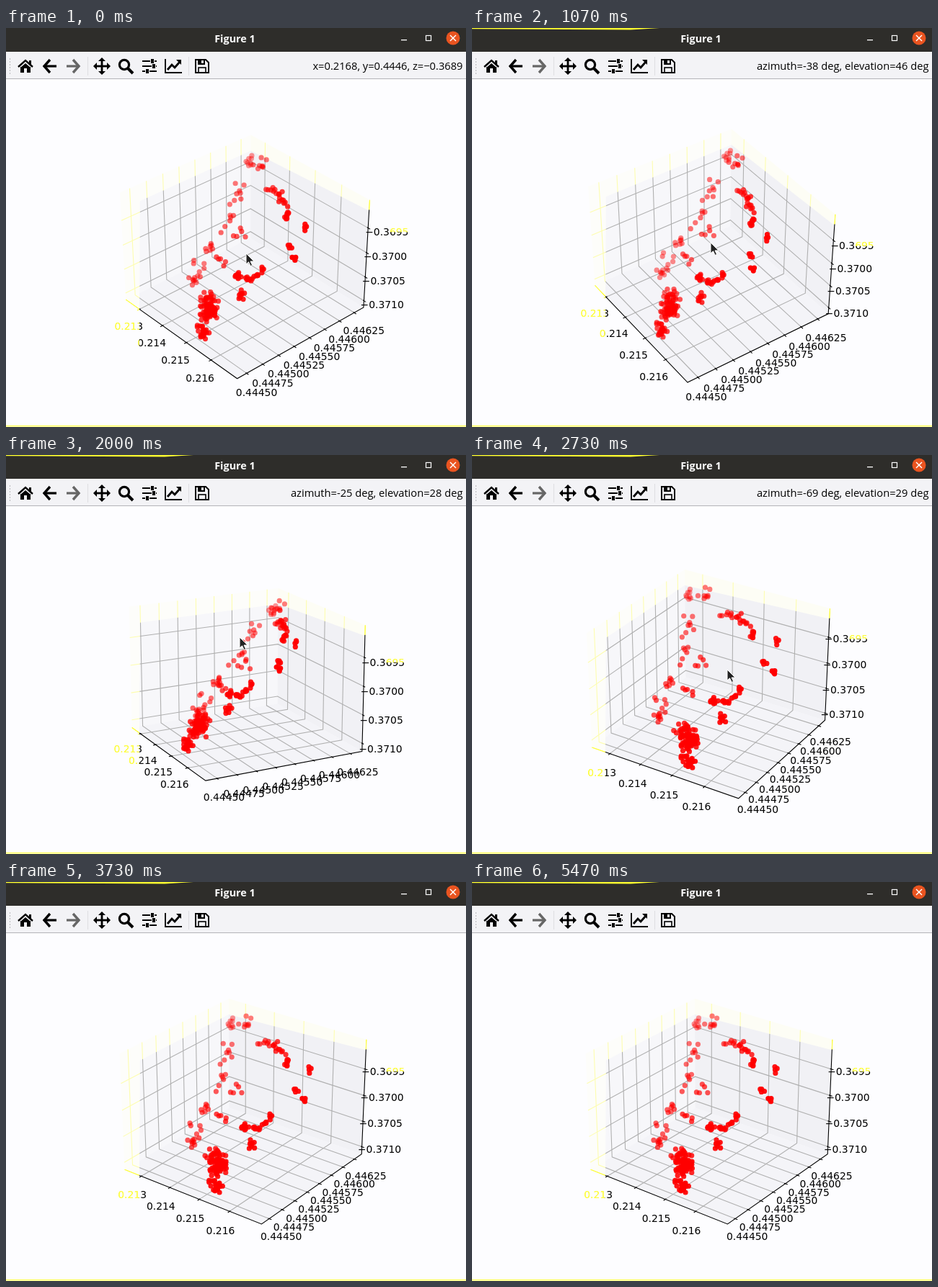
Animation of 638x554 px, one loop 5540 ms. Source, as an HTML page with a canvas:

```html
<!DOCTYPE html>
<html lang="en">
<head>
<meta charset="utf-8">
<title>Figure 1</title>
<style>
  html, body { margin: 0; width: 100%; height: 100%; overflow: hidden; background: #fdfdff; }
  canvas { display: block; }
</style>
</head>
<body>
<canvas id="stage" width="638" height="554"></canvas>
<script>
const ctx = document.getElementById('stage').getContext('2d');
const W = 638, H = 554, LOOP = 5540;
const DRAG_START = 200, DRAG_END = 3250, STATUS_LAG = 130;
const HX = 0.5952, HZ = 0.4464;      // half sizes of the plot box
const PAD = 0.0986, PAD_Z = 0.0739;  // distance of tick labels from the box
const YELLOW = 'rgb(253,253,70)', EDGE_YELLOW = '#ffff30', TOOLBAR = '#f3f3f6';

// time, azimuth, elevation
const VIEW = [
  [DRAG_START, -41.8, 34], [930, -38, 46], [1070, -34.65, 40], [1870, -25, 28],
  [2000, -27.65, 17], [2600, -69, 29], [2730, -57.7, 29], [DRAG_END, -52.7, 27]
];
// time, x, y
const POINTER = [[DRAG_START, 333, 313], [1070, 331, 298], [2000, 324, 253], [2730, 354, 298]];

let seed = 7;
const random = () => (seed = (seed * 16807) % 2147483647) / 2147483647;
const jitter = size => (random() + random() + random() - 1.5) * 1.6 * size;

// Scatters points around each node, reaching part of the way to the next one
const strand = (count, reach, spread, ...nodes) => nodes.flatMap((node, i) => {
  const next = nodes[i + 1] || node;
  return Array.from({ length: count }, () => {
    const k = random() * reach;
    return node.map((v, axis) => v + (next[axis] - v) * k + jitter(spread));
  });
});

const points = [
  ...strand(8, 0, 0.026, [-0.5, 0.49, 0.305], [-0.32, 0.44, 0.375]),
  ...strand(7, 0.8, 0.026, [-0.34, 0.3, 0.28], [-0.3, 0.15, 0.13], [-0.27, -0.02, -0.02],
    [-0.33, -0.09, -0.16], [-0.29, -0.22, -0.3]),
  ...strand(5, 0, 0.03, [-0.13, 0.06, 0.08], [-0.1, -0.14, -0.06]),
  ...strand(9, 0.8, 0.012, [-0.11, 0.31, 0.33], [0.07, 0.27, 0.38], [0.23, 0.19, 0.32]),
  ...strand(4, 0.1, 0.011, [0.44, 0.16, 0.34], [0.39, 0.06, 0.22], [0.5, -0.01, 0.2]),
  ...strand(10, 0.7, 0.014, [0.31, -0.1, 0.06], [0.25, -0.16, -0.03], [0.14, -0.19, -0.05]),
  ...strand(9, 0, 0.02, [0.26, -0.27, -0.11]),
  ...strand(36, 0.8, 0.036, [-0.06, -0.31, -0.24], [0.1, -0.4, -0.28]),
  ...strand(14, 0.9, 0.02, [0.04, -0.44, -0.31], [0.17, -0.52, -0.36])
];

function sample(keys, t) {
  if (t <= keys[0][0]) return keys[0].slice(1);
  const i = keys.findIndex(key => key[0] > t);
  if (i < 0) return keys[keys.length - 1].slice(1);
  const a = keys[i - 1], b = keys[i], k = (t - a[0]) / (b[0] - a[0]);
  return [1, 2].map(c => a[c] + (b[c] - a[c]) * k);
}

function camera([azimuth, elevation]) {
  const az = azimuth * Math.PI / 180, el = elevation * Math.PI / 180;
  const sa = Math.sin(az), ca = Math.cos(az), se = Math.sin(el), ce = Math.cos(el);
  return ([x, y, z]) => {
    const depth = 10 - (ce * ca * x + ce * sa * y + se * z);
    return {
      x: 330.5 + 2010 * (-sa * x + ca * y) / depth,
      y: 310 - 2010 * (-se * ca * x - se * sa * y + ce * z) / depth,
      depth
    };
  };
}

function trace(path, close) {
  ctx.beginPath();
  path.forEach(([x, y]) => ctx.lineTo(x, y));
  if (close) ctx.closePath();
}
function line(path, color = '#000', width = 1.1, close = false) {
  trace(path, close);
  ctx.strokeStyle = color;
  ctx.lineWidth = width;
  ctx.stroke();
}
function shape(path, color = '#000') {
  trace(path, true);
  ctx.fillStyle = color;
  ctx.fill();
}
function rect(x, y, w, h, color = '#000') {
  ctx.fillStyle = color;
  ctx.fillRect(x, y, w, h);
}
function box(x, y, w, h, color, width) {
  ctx.strokeStyle = color;
  ctx.lineWidth = width;
  ctx.strokeRect(x, y, w, h);
}
function disc(x, y, r, color) {
  ctx.beginPath();
  ctx.arc(x, y, r, 0, 7);
  ctx.fillStyle = color;
  ctx.fill();
}
function text(str, x, y, font, color, align) {
  ctx.font = font;
  ctx.fillStyle = color;
  ctx.textAlign = align;
  ctx.fillText(str, x, y);
}

function drawPlot(t) {
  const project = camera(sample(VIEW, t));
  const flat = p => { const q = project(p); return [q.x, q.y]; };
  const line3 = (color, ...path) => line(path.map(flat), color);
  const pane = (color, ...path) => shape(path.map(flat), color);
  const label = (str, p) => {
    const [x, y] = flat(p);
    text(str, x, y + 9.5, '13.89px "DejaVu Sans", sans-serif', '#000', 'center');
    return [x, y];
  };
  const ticks = (count, start, step, draw) => {
    for (let i = 0; i < count; i++) draw(start + step * i, i);
  };
  const eachX = draw => ticks(4, -0.4416, 0.2575, draw);
  const eachY = draw => ticks(8, -0.5115, 0.1447, draw);
  const eachZ = draw => ticks(4, -0.388, 0.2036, draw);

  pane('rgba(242,242,246,.5)', [-HX, -HX, -HZ], [-HX, HX, -HZ], [-HX, HX, HZ], [-HX, -HX, HZ]);
  pane('rgba(230,230,236,.5)', [-HX, HX, -HZ], [HX, HX, -HZ], [HX, HX, HZ], [-HX, HX, HZ]);
  pane('rgba(236,236,241,.5)', [-HX, -HX, -HZ], [HX, -HX, -HZ], [HX, HX, -HZ], [-HX, HX, -HZ]);

  const grid = '#b0b0b0';
  eachX(x => line3(grid, [x, -HX, -HZ], [x, HX, -HZ], [x, HX, HZ]));
  eachY(y => line3(grid, [HX, y, -HZ], [-HX, y, -HZ], [-HX, y, HZ]));
  eachZ(z => line3(grid, [-HX, -HX, z], [-HX, HX, z], [HX, HX, z]));
  line3('#000', [-HX, -HX, -HZ], [HX, -HX, -HZ], [HX, HX, -HZ], [HX, HX, HZ]);

  const out = HX + 0.019, inner = HX - 0.0095;
  let topLabel;
  eachX((x, i) => {
    line3('#000', [x, -out, -HZ], [x, -inner, -HZ]);
    label((0.213 + 0.001 * i).toFixed(3), [x, -HX - PAD, -HZ - PAD_Z]);
  });
  eachY((y, i) => {
    line3('#000', [out, y, -HZ], [inner, y, -HZ]);
    label((0.4445 + 0.00025 * i).toFixed(5), [HX + PAD, y, -HZ - PAD_Z]);
  });
  eachZ((z, i) => {
    line3('#000', [out, HX, z], [inner, HX, z]);
    topLabel = label('\u2212' + (0.371 - 0.0005 * i).toFixed(4), [HX + 0.09, HX + 0.09, z]);
  });

  // Yellow fade along the left and top of the box
  const left = flat([-HX, -HX, HZ]), back = flat([-HX, HX, HZ]), right = flat([HX, HX, HZ]);
  const slope = (back[1] - left[1]) / (back[0] - left[0]);
  ctx.globalCompositeOperation = 'lighten';
  shape([
    [0, 72], [W, 72], [W, right[1] - 6], [right[0] - 3, right[1] + 14], [back[0], back[1] + 22],
    [186, left[1] + (186 - left[0]) * slope + 24], [184, H], [0, H]
  ], YELLOW);
  rect(topLabel[0] + 4, topLabel[1] - 3, 32, 8, YELLOW);
  ctx.globalCompositeOperation = 'source-over';

  const dots = points.map(project).sort((a, b) => b.depth - a.depth);
  const far = dots[0].depth, near = dots[dots.length - 1].depth;
  for (const { x, y, depth } of dots) {
    const alpha = 1 - 0.6 * (depth - near) / (far - near);
    disc(x, y, 3.6, `rgba(255,0,0,${alpha})`);
  }
}

function drawIcons() {
  // home
  line([[17, 54], [27, 45], [37, 54]], '#000', 2.4);
  rect(32, 45, 3, 6);
  rect(20, 54, 14, 8);
  shape([[20, 55], [27, 49], [34, 55]]);
  rect(25, 56, 4, 6, TOOLBAR);
  // back and forward
  for (const [x, dir, color] of [[52, 1, '#000'], [102, -1, '#666']]) {
    line([[x, 53], [x + 18 * dir, 53]], color, 3.2);
    line([[x + 9 * dir, 44], [x + dir, 53], [x + 9 * dir, 62]], color, 3.4);
  }
  // pan
  for (const [dx, dy] of [[1, 0], [-1, 0], [0, 1], [0, -1]]) {
    const at = (along, side) => [133 + dx * along + dy * side, 53 + dy * along + dx * side];
    line([at(0, 0), at(8, 0)], '#000', 2.8);
    shape([at(12, 0), at(7, 5), at(7, -5)]);
  }
  // zoom
  disc(164, 51, 8.2, '#000');
  disc(164, 51, 5, TOOLBAR);
  line([[169, 56], [176, 63]], '#000', 4);
  // sliders
  [201, 203, 194].forEach((knob, i) => {
    const y = 46 + 7 * i;
    line([[189, y], [209, y]], '#000', 2);
    rect(knob - 1, y - 3, 6, 6, TOOLBAR);
    rect(knob, y - 3, 4, 6);
  });
  // chart
  line([[221, 43], [221, 62], [244, 62]], '#000', 1.8);
  line([[224, 58], [230, 51], [234, 55], [241, 47]], '#000', 2.8);
  shape([[236, 44], [243, 44], [243, 51]]);
  // save
  line([[263, 44], [277, 44], [281, 48], [281, 62], [263, 62]], '#000', 2, true);
  rect(266, 44, 10, 7);
  rect(271, 45, 3, 4, TOOLBAR);
  box(267, 55, 10, 7, '#000', 1.6);
}

function drawToolbar(t) {
  rect(0, 33, W, 38, TOOLBAR);
  rect(0, 70, W, 1, '#b4b4b8');
  for (let y = 42; y < 66; y += 4) rect(5, y, 1, 2, '#b8b8bc');
  for (const x of [113, 253]) rect(x, 40, 1, 26, '#dedee2');
  drawIcons();

  let status = '';
  if (t < DRAG_START) {
    status = 'x=0.2168, y=0.4446, z=\u22120.3689';
  } else if (t < DRAG_END) {
    const [az, el] = sample(VIEW, t - STATUS_LAG).map(Math.round);
    status = `azimuth=${az} deg, elevation=${el} deg`;
  }
  text(status, 633.5, 58, '14.7px "Open Sans", sans-serif', '#000', 'right');
}

function drawTitleBar() {
  rect(0, 0, W, 33, '#2e2d2a');
  text('Figure 1', 317.5, 20, 'bold 14.4px "Open Sans", sans-serif', '#fff', 'center');
  rect(548, 16, 8, 1.3, '#fff');
  box(582.5, 10.5, 7, 7, '#fff', 1.2);
  disc(620, 14, 9.5, '#e95420');
  line([[616, 10], [624, 18]], '#fff', 1.4);
  line([[624, 10], [616, 18]], '#fff', 1.4);
}

function drawPointer(t) {
  if (t >= DRAG_END) return;
  const [x, y] = sample(POINTER, t);
  const arrow = [[0, 0], [0, 15], [3.5, 11.8], [6.2, 17.5], [8.6, 16.3], [6, 11], [11, 11]];
  const path = arrow.map(([dx, dy]) => [x + dx, y + dy]);
  shape(path, '#222');
  line(path, '#fff', 1, true);
}

function drawEdges(t) {
  rect(0, 552, W, 1.2, EDGE_YELLOW);
  if (t >= 70) shape([[0, 0], [260, 0], [220, 2.5], [0, 1.2]], EDGE_YELLOW);
}

function frame() {
  const t = performance.now() % LOOP;
  rect(0, 0, W, H, '#fdfdff');
  drawPlot(t);
  drawTitleBar();
  drawToolbar(t);
  drawPointer(t);
  drawEdges(t);
  requestAnimationFrame(frame);
}
frame();
</script>
</body>
</html>
```
